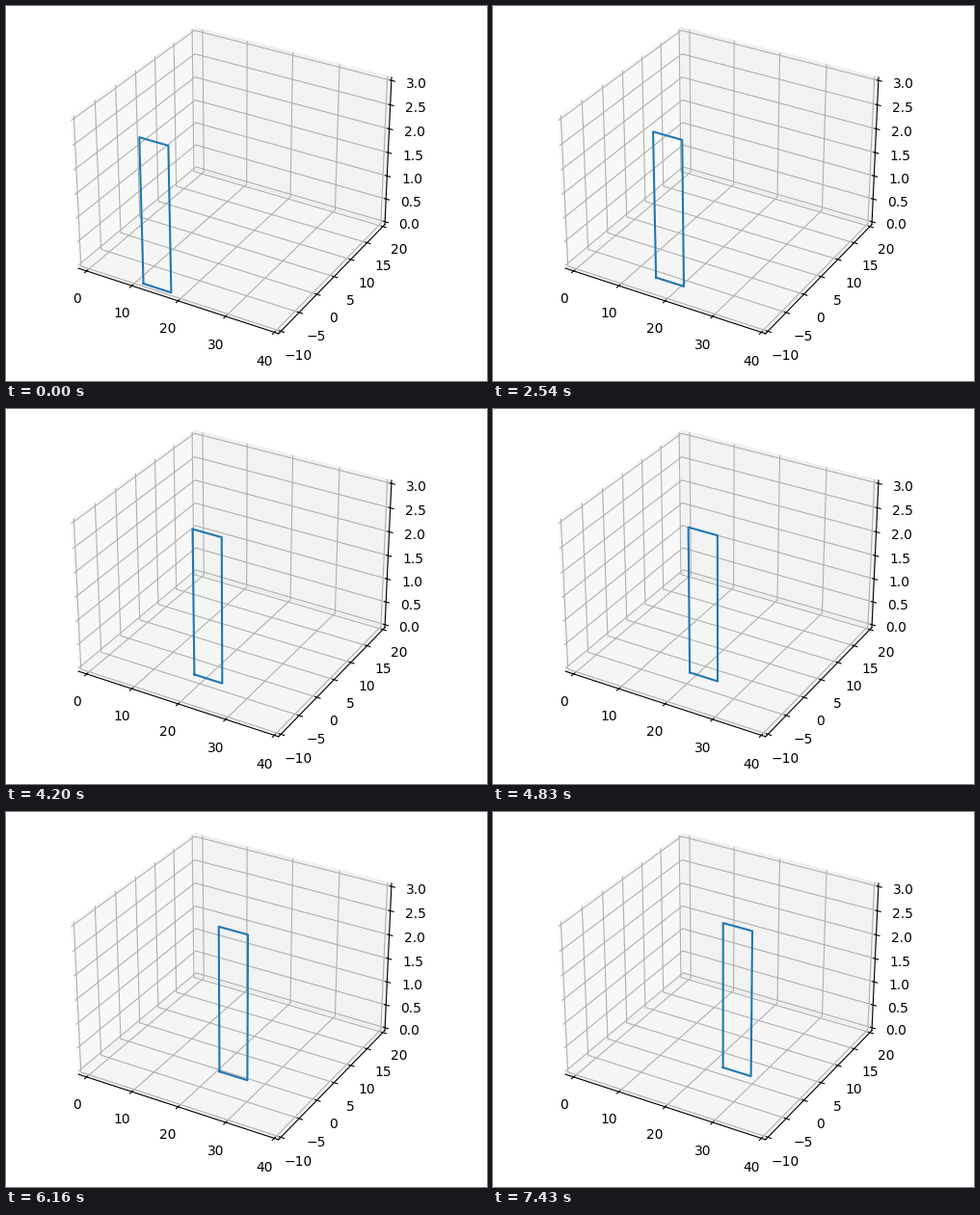
A matplotlib script that plays this animation: 499x389 px, repeating every 8000 ms.

```python
import matplotlib.pyplot as plt
import numpy as np
from matplotlib.animation import FuncAnimation

W, H, DPI = 499, 389, 100
LOOP, STEP = 8000, 40  # ms

# moments at which the panel moves one unit along x and y
MOVES = [660, 1040, 2540, 2900, 3610, 4200, 4830, 5520, 6160, 6790, 7430]

# outline of the panel relative to its near lower corner
DX = np.array([0, 6, 6, 0, 0])
DZ = np.array([0, 0, 3, 3, 0])
START_X, START_Y = 12, -10


def padded(low, high):
    pad = (high - low) / 48
    return low - pad, high + pad


fig = plt.figure(figsize=(W / DPI, H / DPI), dpi=DPI, facecolor="white")
side = 369.6
ax = fig.add_axes([47.2 / W, 25.8 / H, side / W, side / H], projection="3d")
ax.view_init(elev=30, azim=-60)

ax.set_xticks(np.arange(0, 41, 10))
ax.set_yticks(np.arange(-10, 21, 5))
ax.set_zticks(np.arange(0, 3.1, 0.5))

panel, = ax.plot(START_X + DX, np.full(5, START_Y), DZ, color="C0", lw=1.5)

ax.set_xlim(*padded(-1, 40))
ax.set_ylim(*padded(-10, 20))
ax.set_zlim(*padded(0, 3))


def update(i):
    # a move falling inside this frame already counts
    end = (i + 1) * STEP
    k = sum(t < end for t in MOVES)
    panel.set_data_3d(START_X + k + DX, np.full(5, START_Y + k), DZ)
    return panel,


anim = FuncAnimation(fig, update, frames=LOOP // STEP, interval=STEP,
                     repeat=True, repeat_delay=0, blit=False)
plt.show()
```
